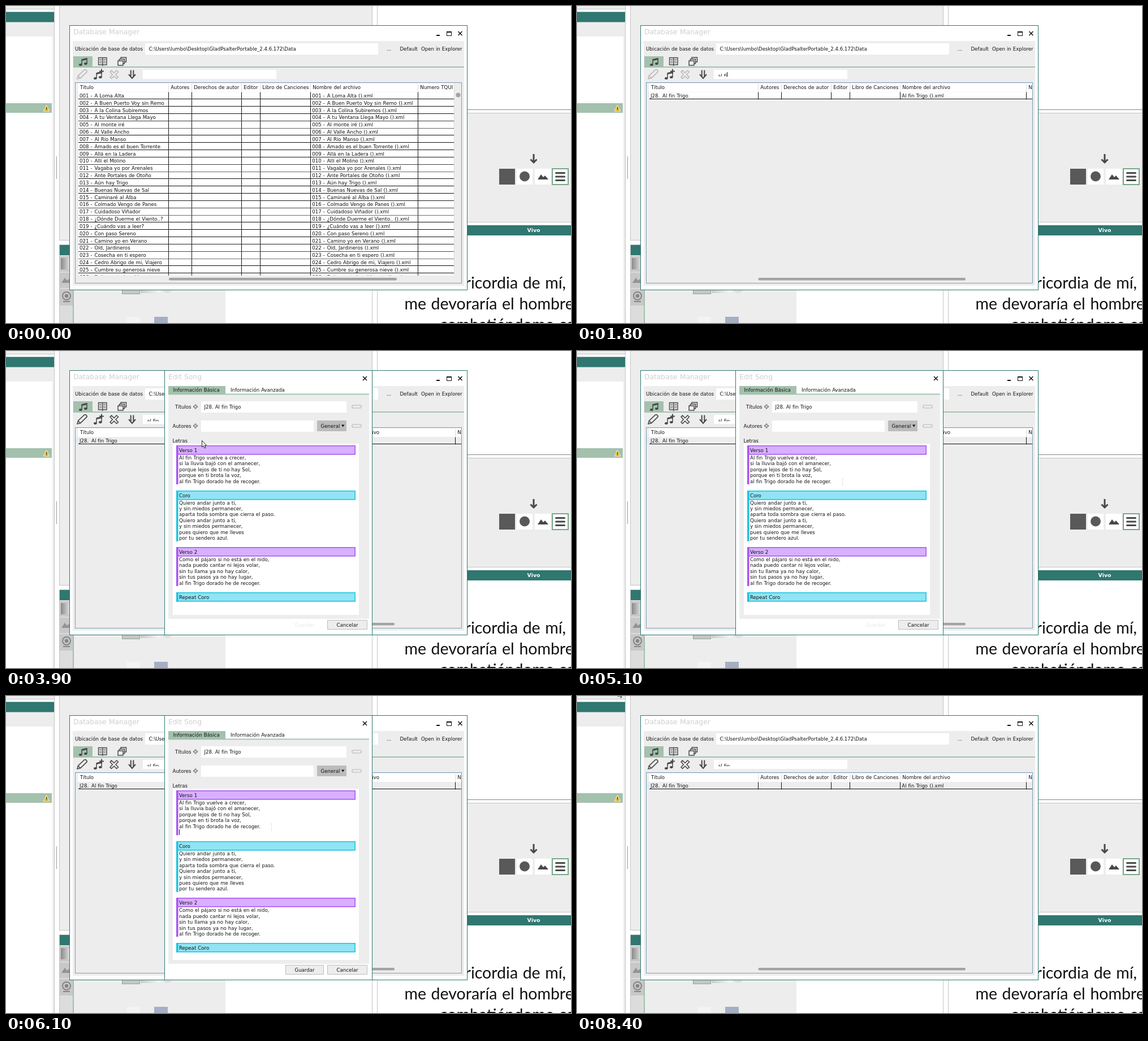
Recreate the animation shown at these times as an HTML page with a canvas. Size 999 by 561 pixels, loop 8.5 s.

```html
<!DOCTYPE html>
<html lang="es">
<head>
<meta charset="utf-8">
<title>Song editor</title>
<style>
html, body { margin: 0; width: 100%; height: 100%; overflow: hidden; background: #fff; }
canvas { display: block; }
</style>
</head>
<body>
<canvas id="stage" width="999" height="561"></canvas>
<script>
const ctx = document.getElementById('stage').getContext('2d');
const LOOP = 8500;
const TEAL = '#2f7770', GREEN = '#a3c1ad', PANEL = '#ededed', INK = '#111', ICON = '#484848', PALE = '#b9b9b9';
const UI = '8.6px "DejaVu Sans", sans-serif';
const HEAD = '12.3px "DejaVu Sans", sans-serif';

const SONGS = [
  'A Loma Alta', 'A Buen Puerto Voy sin Remo', 'A la Colina Subiremos', 'A tu Ventana Llega Mayo',
  'Al monte iré', 'Al Valle Ancho', 'Al Río Manso', 'Amado es el buen Torrente', 'Allá en la Ladera',
  'Allí el Molino', 'Vagaba yo por Arenales', 'Ante Portales de Otoño', 'Aún hay Trigo',
  'Buenas Nuevas de Sal', 'Caminaré al Alba', 'Colmado Vengo de Panes', 'Cuidadoso Viñador',
  '¿Dónde Duerme el Viento..?', '¿Cuándo vas a leer?', 'Con paso Sereno', 'Camino yo en Verano',
  'Oíd, Jardineros', 'Cosecha en ti espero', 'Cedro Abrigo de mi, Viajero', 'Cumbre su generosa nieve',
  'Dulce es todo mi huerto'
].map((name, i) => [String(i + 1).padStart(3, '0') + ' -', name]);
const PICK = ['J28.', 'Al fin Trigo'];
const FOUND = [
  ['B14.', 'Al filo de la Siembra'], ['C02.', 'Al fin Ventana sobre Campos de Avena'], ['D31.', 'Al fin Orilla'],
  ['F09.', 'Al fin Rocío'], ['H17.', 'Al firme Sendero'], PICK, ['K05.', 'Al fin Alondra']
];
const HEADERS = ['Autores', 'Derechos de autor', 'Editor', 'Libro de Canciones', 'Nombre del archivo', 'Numero TQUI'];
const ALL_COLS = [287, 328, 416, 449, 538, 728];
const FOUND_COLS = [320, 361, 449, 482, 571, 794];

const REFRAIN = 'al fin Trigo dorado he de recoger.';
const BLOCKS = [
  ['Verso 1', 0, ['Al fin Trigo vuelve a crecer,', 'si la lluvia bajó con el amanecer,',
    'porque lejos de ti no hay Sol,', 'porque en ti brota la voz,', REFRAIN]],
  ['Coro', 1, ['Quiero andar junto a ti,', 'y sin miedos permanecer,', 'aparta toda sombra que cierra el paso.',
    'Quiero andar junto a ti,', 'y sin miedos permanecer,', 'pues quiero que me lleves', 'por tu sendero azul.']],
  ['Verso 2', 0, ['Como el pájaro si no está en el nido,', 'nada puedo cantar ni lejos volar,',
    'sin tu llama ya no hay calor,', 'sin tus pasos ya no hay lugar,', REFRAIN]],
  ['Repeat Coro', 1, []]
];
const SHADES = [['#d8b0ff', '#a855f0'], ['#90e4f4', '#1cc3de']];

// Each entry: start time, then value(s), held until the next entry.
const POINTER = [
  [0], [200, 303, 84, 'arrow'], [300, 311, 101, 'arrow'], [400, 315, 118, 'beam'], [700],
  [2600, 315, 118, 'beam'], [2700, 311, 126, 'arrow'], [2800, 300, 141, 'arrow'], [2900, 289, 154, 'arrow'],
  [3000, 283, 159, 'arrow'], [3500, 306, 165, 'arrow'], [3600, 326, 168, 'arrow'], [3900, 346, 158, 'arrow'],
  [4000, 372, 163, 'beam'], [4100, 400, 182, 'beam'], [4200, 430, 208, 'beam'], [4300, 460, 232, 'beam'],
  [4400, 477, 245, 'beam'], [4500, 473, 237, 'beam'], [4600, 469, 232, 'beam'],
  [6500, 485, 262, 'beam'], [6600, 514, 360, 'arrow'], [6700, 539, 470, 'arrow'], [6800, 549, 523, 'arrow'],
  [6900, 537, 484, 'arrow'], [7800, 420, 330, 'arrow'], [7900, 230, 120, 'arrow'], [8000, 88, 7, 'arrow'],
  [8200, 82, 2, 'arrow'], [8300, 75, -6, 'arrow'], [8400, 72, -11, 'arrow']
];
const TYPED = [[0, ''], [1300, 'a'], [1500, 'al'], [1600, 'al f'], [1800, 'al fi'], [1900, 'al fin']];
const BREAKS = [[0, 0], [5300, 1], [5500, 2], [6100, 1], [6300, 0]];

const at = (keys, t) => keys.findLast(k => k[0] <= t);
const within = (t, a, b) => t >= a && t < b;

function rect(x, y, w, h, fill) {
  ctx.fillStyle = fill;
  ctx.fillRect(x, y, w, h);
}
function frame(x, y, w, h, color, width = 1) {
  ctx.strokeStyle = color;
  ctx.lineWidth = width;
  ctx.strokeRect(x + width / 2, y + width / 2, w - width, h - width);
}
function box(x, y, w, h, fill, border, width) {
  rect(x, y, w, h, fill);
  frame(x, y, w, h, border, width);
}
function text(s, x, y, color = INK, font = UI, align = 'left', gap = 0.3) {
  ctx.font = font;
  ctx.wordSpacing = gap + 'px';
  ctx.textAlign = align;
  ctx.fillStyle = color;
  ctx.fillText(s, x, y);
}
function path(d, color, width, x = 0, y = 0) {
  ctx.save();
  ctx.translate(x, y);
  const p = new Path2D(d);
  if (width) {
    ctx.strokeStyle = color;
    ctx.lineWidth = width;
    ctx.stroke(p);
  } else {
    ctx.fillStyle = color;
    ctx.fill(p);
  }
  ctx.restore();
}
function dot(x, y, r, fill) {
  ctx.beginPath();
  ctx.arc(x, y, r, 0, 7);
  ctx.fillStyle = fill;
  ctx.fill();
}
function pill(x, y, w, h, fill) {
  ctx.beginPath();
  ctx.roundRect(x, y, w, h, h / 2);
  ctx.fillStyle = fill;
  ctx.fill();
}
function clipped(x, y, w, h, draw) {
  ctx.save();
  ctx.beginPath();
  ctx.rect(x, y, w, h);
  ctx.clip();
  draw();
  ctx.restore();
}
function fade(x, y, w, h, from, to) {
  const g = ctx.createLinearGradient(x, 0, x + w, 0);
  g.addColorStop(0, from);
  g.addColorStop(1, to);
  rect(x, y, w, h, g);
}
const hills = (x, y, color) => path('M0 11L6 2L10 7L13 4L19 11Z', color, 0, x, y);
const closeMark = (x, y) => path('M-3.5 -3.5L3.5 3.5M3.5 -3.5L-3.5 3.5', '#111', 1.5, x, y);

function note(x, y) {
  path('M5 11V2L14 0V9', ICON, 1.5, x, y);
  path('M5 1L14 -1V2L5 4ZM0 11a2.8 2 0 1 0 5.6 0a2.8 2 0 1 0 -5.6 0M9 9a2.8 2 0 1 0 5.6 0a2.8 2 0 1 0 -5.6 0', ICON, 0, x, y);
}

function backdrop() {
  rect(0, 0, 999, 561, '#fff');
  rect(0, 0, 86, 6, PANEL);
  rect(0, 5, 86, 1, '#c4c4c4');
  rect(0, 10, 86, 551, PANEL);
  rect(0, 10.5, 85, 18, TEAL);
  rect(0, 54, 82, 507, '#fff');
  rect(85, 0, 1, 561, '#c4c4c4');
  rect(0, 172, 81, 17, GREEN);
  path('M71.5 175.5L77 186H66Z', '#efbf2a');
  path('M71.5 175.5L77 186H66Z', '#f6ecc4', 1);
  rect(71, 179, 1.3, 3.5, '#333');
  rect(71, 183.5, 1.3, 1.3, '#333');
  rect(89, 266, 1, 40, '#999');

  box(94, -2, 554, 417, PANEL, '#c4c4c4');
  box(94, 422, 554, 150, '#fff', '#c4c4c4');
  rect(95, 423, 552, 18, TEAL);
  rect(95, 441, 24, 120, '#dcdcdc');
  rect(95, 443, 24, 27, '#c8c8c8');
  fade(97, 446, 16, 20, '#8a8a8a', '#e0e0e0');
  rect(95, 472, 24, 27, '#c8c8c8');
  hills(98, 479, '#939393');
  rect(95, 501, 24, 29, '#c8c8c8');
  ctx.strokeStyle = '#858585';
  ctx.lineWidth = 2;
  ctx.beginPath();
  ctx.arc(107, 513, 7, 0, 7);
  ctx.stroke();
  dot(107, 513, 3.2, '#858585');
  path('M101 523H113', '#858585', 2);
  rect(118, 441, 2, 120, GREEN);
  rect(120, 441, 268, 120, PANEL);
  box(205, 480, 32, 30, '#c6c6c6', '#8fa598');
  fade(238, 480, 34, 28, '#c9c9c9', '#f4f4f4');
  dot(285, 498, 10, '#dedede');
  rect(213, 550, 24, 11, '#f3f3f3');
  rect(262, 550, 24, 11, '#a5afc4');

  rect(656, 0, 1, 561, '#c4c4c4');
  rect(657, 183, 342, 1, '#858585');
  box(657, 189, 350, 194, PANEL, '#c4c4c4');
  path('M933 262V277M927.5 271.5L933 277L938.5 271.5', ICON, 3);
  rect(872, 288, 28, 28, '#595959');
  rect(903, 288, 28, 28, '#fff');
  dot(917, 301.5, 9, '#595959');
  rect(935, 288, 28, 28, '#fff');
  hills(940, 296, ICON);
  box(965, 287, 30, 30, '#fff', '#78a888', 2);
  for (const y of [294, 300.5, 307]) pill(971, y, 18, 3, ICON);
  rect(657, 388, 342, 18, TEAL);
  text('Vivo', 933, 400, '#fff', 'bold 9.4px "DejaVu Sans", sans-serif', 'center');
  const verse = '28.5px Lato, sans-serif';
  text('misericordia de mí,', 990, 500, '#111', verse, 'right', 1.3);
  text('me devoraría el hombre', 704.5, 537, '#111', verse, 'left', 1.3);
  text('combatiéndome cada', 767, 574, '#111', verse, 'left', 1.3);
}

function toolbar(active) {
  rect(119, 89, 34, 19, GREEN);
  rect(119, 107, 691, 2, GREEN);
  note(129, 93);
  path('M163.5 91.5H178V104H163.5ZM170.7 91.5V106', ICON, 1.4);
  path('M165 94.5H169.5M165 97.5H169.5M165 100.5H169.5M172 94.5H176.5M172 97.5H176.5M172 100.5H176.5', ICON, 1);
  path('M198 97H207V105H198ZM200.5 97V94H209.5V102H207M203 94V91H212.5V99H209.5', ICON, 1.5);

  const tone = active ? ICON : PALE;
  path('M126 129L127.5 123.5L138.5 113Q140.5 112 142 113.5Q144 115.5 142.5 117.2L131.5 127.7ZM127.5 123.5L131.5 127.7', tone, 1.6);
  note(155, 117);
  path('M169 111.5V119.5M165 115.5H173', ICON, 2);
  path('M184 116.5L186.5 114L191 118.5L195.5 114L198.5 116.5L194 121.2L198.5 126L195.5 128.5L191 124L186.5 128.5L184 126L188.3 121.2Z', tone, 1.5);
  path('M220.7 113.5V126M225.3 113.5V126M217 121L223 128L229 121', ICON, 2);
}

function list(rows, cols, selected) {
  const full = cols === ALL_COLS;
  const right = full ? 792 : 805;
  box(122, 135, 684, 356, PANEL, '#7d9db8');
  clipped(123, 136, right - 123, 341, () => {
    rect(127, 137, right - 127, 15, '#fff');
    text('Título', 131, 147);
    HEADERS.forEach((h, i) => {
      rect(cols[i], 138, 1, 14, '#dcdcdc');
      text(h, cols[i] + 4.2, 147);
    });
    rows.forEach(([tag, name], i) => {
      const y = 152.5 + i * 12.83;
      const base = y + 9.5;
      const gap = full ? 26.4 : 21;
      rect(128, y, right - 128, 12.83, selected ? PANEL : '#fff');
      clipped(127, 152, cols[0] - 127, 330, () => {
        text(tag, 130, base);
        text(name, 130 + gap, base);
      });
      const x = cols[4] + 3.3;
      if (full) text(tag, x, base);
      text(name.replace('?', '') + ' ().xml', full ? x + gap : x, base);
      rect(128, Math.floor(y + 12.3), right - 128, 1, '#111');
      for (const c of cols) rect(c, y, 1, 12.83, '#111');
    });
  });
  if (selected) rect(123, 153, 4, 12, '#dcebf7');
  if (full) {
    rect(792, 137, 1, 340, '#d8d8d8');
    dot(799.5, 157.5, 4, '#a3a3a3');
    pill(288, 481, 403, 4.5, '#a3a3a3');
  } else {
    pill(320.5, 481, 366.5, 4.5, '#a3a3a3');
  }
}

function manager(t) {
  box(112, 34, 704, 469, '#fff', TEAL);
  text('Database Manager', 119, 50, '#cfcfcf', HEAD);
  rect(761, 51, 6, 2, '#111');
  frame(779, 45, 9, 8, '#111', 1);
  rect(779, 45, 9, 2, '#111');
  closeMark(803, 48.5);
  rect(118, 62, 692, 433, PANEL);
  text('Ubicación de base de datos', 122, 79);
  rect(246, 66, 412, 20, '#fff');
  text('C:\\Users\\lumbo\\Desktop\\GladPsalterPortable_2.4.6.172\\Data', 252.5, 79);
  text('...', 673, 79);
  text('Default', 696.5, 79);
  text('Open in Explorer', 734, 79);
  toolbar(t >= 3000);

  rect(242, 113, 236, 16, '#fff');
  const typed = at(TYPED, t)[1];
  clipped(242, 113, 236, 11.5, () => text(typed, 249, 126.5));
  if (within(t, 400, 600) || within(t, 1200, 2400)) {
    rect(249 + Math.floor(ctx.measureText(typed).width), 117, 1, 8, '#111');
  }

  if (t < 1600) list(SONGS, ALL_COLS, false);
  else list(t < 1800 ? FOUND : [PICK], FOUND_COLS, t >= 3000);
}

function field(label, x, y) {
  text(label, x, y + 3.5);
  path('M-1 -3.5H1V-1H3.5V1H1V3.5H-1V1H-3.5V-1H-1Z', '#555', 0.9, 335, y);
  ctx.beginPath();
  ctx.roundRect(612, y - 2.5, 16, 5, 1.5);
  ctx.strokeStyle = '#b5b5b5';
  ctx.lineWidth = 1.2;
  ctx.stroke();
}

function lyrics(t) {
  const breaks = at(BREAKS, t)[1];
  const pitch = 10.4;
  let y = 167;
  BLOCKS.forEach(([title, kind, lines], n) => {
    const [fill, edge] = SHADES[kind];
    const count = lines.length + (n ? 0 : breaks);
    const top = Math.round(y);
    if (count) rect(301, top, 3.5, 17 + count * pitch, edge);
    box(301, top, 317, 16.5, fill, edge, 1.5);
    rect(301, top, 3.5, 16.5, edge);
    text(title, 306, top + 11.5);
    lines.forEach((s, i) => text(s, 306, y + 25 + i * pitch));
    y += 27.6 + count * pitch;
  });
  if (within(t, 4600, 5100) || t >= 5300) {
    ctx.font = UI;
    const x = breaks ? 306 : 306 + Math.floor(ctx.measureText(REFRAIN).width);
    rect(x, Math.round(225.5 + breaks * pitch), 1, 10, '#111');
  }
}

function button(label, x, w, fill) {
  box(x, 476, w, 17, fill, '#bdbdbd');
  text(label, x + w / 2, 488, INK, UI, 'center');
}

function editor(t) {
  box(280, 34, 368, 469, '#fff', TEAL);
  text('Edit Song', 287, 50, '#cfcfcf', HEAD);
  closeMark(634.5, 48.5);
  rect(287, 62, 101, 15, GREEN);
  rect(287, 75.5, 355, 2, GREEN);
  text('Información Básica', 295.5, 72);
  text('Información Avanzada', 397, 72);
  rect(287, 78, 355, 396, PANEL);
  field('Títulos', 299, 98.5);
  rect(345, 89, 257, 20, '#fff');
  text(PICK.join(' '), 350.5, 102);
  field('Autores', 294.5, 132.5);
  rect(345, 123, 199, 20, '#fff');
  rect(550, 123, 52, 19, '#bcbcbc');
  text('General', 556.5, 136);
  path('M593 130.5H598.5L595.7 134.5Z', INK);
  text('Letras', 294.5, 162);
  rect(295, 164, 329, 303, '#fff');
  lyrics(t);
  if (t < 5300) text('Guardar', 528, 488, '#e6e6e6', UI, 'center');
  else button('Guardar', 494, 68, t >= 7200 ? '#d6d6d6' : PANEL);
  button('Cancelar', 568, 71, PANEL);
}

function pointer(t) {
  const [, x, y, kind] = at(POINTER, t);
  if (kind === 'beam') {
    path('M-1.5 -6H1.5M0 -6V6M-1.5 6H1.5', '#e0e0e0', 0.8, x + 0.5, y);
  } else if (kind) {
    const d = 'M0.5 0.5V12L3.2 9.6L5 14L7 13.2L5.2 9H8.5Z';
    path(d, '#fff', 0, x, y);
    path(d, '#222', 1, x, y);
  }
}

function draw(now) {
  const t = now % LOOP;
  backdrop();
  manager(t);
  if (within(t, 3400, 7300)) editor(t);
  pointer(t);
}

let start;
function tick(now) {
  start ??= now;
  draw(now - start);
  requestAnimationFrame(tick);
}
draw(0);
requestAnimationFrame(tick);
</script>
</body>
</html>
```
